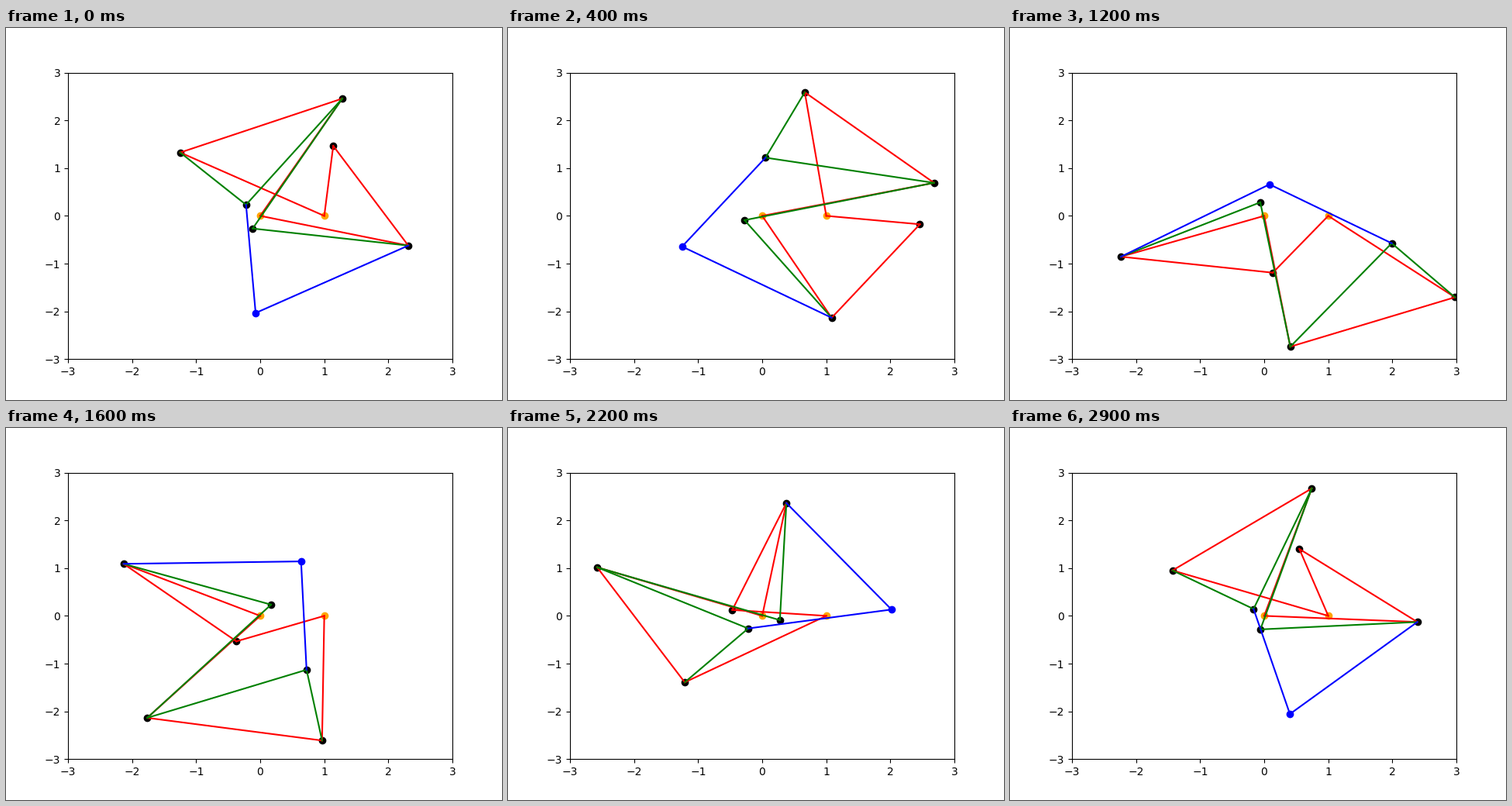
These frames come from a looping animation (640x480 px, 3000 ms). A matplotlib script:

```python
import matplotlib.pyplot as plt
import numpy as np
from matplotlib.animation import FuncAnimation

FRAMES = 30
INTERVAL = 100

# Link lengths
LONG = 2.770
MID = 2.394
ROCKER_TOP = 2.611
ROCKER_LOW = 1.472
KNEE_TOP = 2.683
KNEE_SIDE = 1.501
SHIN = 2.272
STUB = 0.290

# Crank arms turn together; angles in degrees at the start
TOP_ANGLE, LOW_ANGLE, STUB_ANGLE = 62.46, -15.07, 246.13

LINKS = {
    "red": ["OP", "PS", "SB", "OQ", "QR", "RB"],
    "green": ["PT", "TS", "PU", "UQ"],
    "blue": ["TF", "FQ"],
}


def polar(radius, degrees):
    a = np.radians(degrees)
    return radius * np.array([np.cos(a), np.sin(a)])


def join(a, b, from_a, from_b, side):
    """Meeting point of two links; side is +1 left of a->b, -1 right."""
    d = b - a
    dist = np.hypot(*d)
    along = (from_a**2 - from_b**2 + dist**2) / (2 * dist)
    height = np.sqrt(max(from_a**2 - along**2, 0))
    u = d / dist
    return a + along * u + side * height * np.array([-u[1], u[0]])


def solve(turn):
    """Positions of all joints after the crank has turned by some degrees."""
    j = {"O": np.zeros(2), "B": np.array([1.0, 0.0])}
    j["P"] = polar(LONG, TOP_ANGLE + turn)
    j["Q"] = polar(MID, LOW_ANGLE + turn)
    j["U"] = polar(STUB, STUB_ANGLE + turn)
    j["R"] = join(j["Q"], j["B"], MID, ROCKER_LOW, -1)
    j["S"] = join(j["P"], j["B"], LONG, ROCKER_TOP, -1)
    j["T"] = join(j["P"], j["S"], KNEE_TOP, KNEE_SIDE, 1)
    j["F"] = join(j["T"], j["Q"], SHIN, LONG, -1)
    return j


fig, ax = plt.subplots(figsize=(6.4, 4.8), dpi=100)
ax.set_xlim(-3, 3)
ax.set_ylim(-3, 3)

ax.scatter([0, 1], [0, 0], color="orange")
joints = ax.scatter([0] * 6, [0] * 6, color="black")
foot = ax.scatter([0], [0], color="blue")
links = [
    (pair, ax.plot([], [], color=color)[0])
    for color, pairs in LINKS.items()
    for pair in pairs
]


def update(i):
    j = solve(-360 * i / FRAMES)
    joints.set_offsets([j[k] for k in "PQRSTU"])
    foot.set_offsets([j["F"]])
    for (a, b), line in links:
        line.set_data(*zip(j[a], j[b]))
    return [joints, foot] + [line for _, line in links]


anim = FuncAnimation(fig, update, frames=FRAMES, interval=INTERVAL, repeat=True)
plt.show()
```
